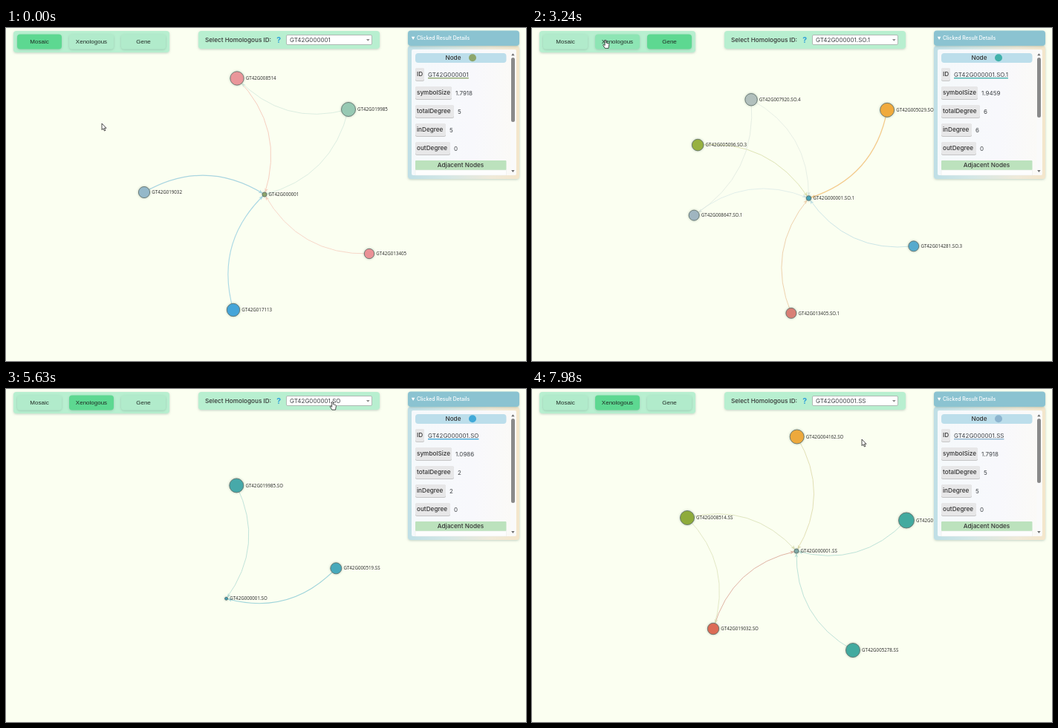
Animation, 700 px wide and 450 px high, one loop 8 s. Source, as an HTML page:

```html
<!DOCTYPE html>
<html lang="en">
<head>
<meta charset="utf-8">
<title>Homologous gene graph</title>
<style>
html, body { margin: 0; width: 100%; height: 100%; overflow: hidden; background: #fbfff1; }
svg { display: block; width: 100%; height: 100%; }
text { font-family: Inter, sans-serif; font-size: 8px; fill: #3f4347; }
.btn { font-family: "Liberation Sans", Arial, sans-serif; text-anchor: middle; fill: #1f2a24; }
.lab { font-family: "Noto Sans", sans-serif; font-size: 6.2px; fill: #333; }
.key { font-size: 8.2px; font-weight: 500; fill: #333; }
.mid { text-anchor: middle; }
.opt { font-size: 9px; }
</style>
</head>
<body>
<svg viewBox="0 0 700 450">
  <defs>
    <filter id="soft" x="-20%" y="-40%" width="140%" height="180%">
      <feDropShadow dx="0" dy="1" stdDeviation="1.8" flood-color="#6a8f80" flood-opacity=".4"/>
    </filter>
    <filter id="halo" x="-60%" y="-60%" width="220%" height="220%">
      <feDropShadow dx="0" dy="0" stdDeviation="1.8" flood-color="#40604c" flood-opacity=".4"/>
    </filter>
    <linearGradient id="frame">
      <stop offset="0" stop-color="#bfdfe6"/>
      <stop offset=".35" stop-color="#d4e7e6"/>
      <stop offset=".75" stop-color="#f0ead9"/>
      <stop offset="1" stop-color="#f4e6cb"/>
    </linearGradient>
    <linearGradient id="paper">
      <stop offset="0" stop-color="#f5f9fb"/>
      <stop offset=".6" stop-color="#f8f8fc"/>
      <stop offset="1" stop-color="#fbfaf6"/>
    </linearGradient>
  </defs>
  <g id="graphs"></g>
  <g id="tabs"></g>
  <g id="picker"></g>
  <g id="panel"></g>
  <g id="menu"></g>
  <g id="cursor" stroke="#222" stroke-width=".8" stroke-linejoin="round" fill="#fff">
    <path id="arrow" d="M0 0V8.6L2 6.8L3.4 10L4.8 9.4L3.4 6.3H6Z"/>
    <path id="hand" d="M-.9 .8Q0-.6 .9 .8V4L4.2 4.9Q5 5.2 4.8 6.4L4 11.4H-.7L-3.3 7.3Q-3.5 6-2.2 6.4L-.9 7.6Z"/>
  </g>
</svg>
<script>
const LOOP = 8000, SPAN = 2790, CURVE = 0.3;
const $ = id => document.getElementById(id);
const NS = document.querySelector('svg').namespaceURI;

function add(parent, tag, attrs, text) {
  const el = document.createElementNS(NS, tag);
  set(el, attrs);
  if (text !== undefined) el.textContent = text;
  parent.appendChild(el);
  return el;
}
function set(el, attrs) {
  for (const k in attrs) el.setAttribute(k, attrs[k]);
}
function rect(parent, x, y, width, height, fill, rx = 0, more = {}) {
  return add(parent, 'rect', { x, y, width, height, fill, rx, ...more });
}
function label(parent, x, y, cls, text, more = {}) {
  return add(parent, 'text', { x, y, class: cls, ...more }, text);
}
const show = (el, on) => el.setAttribute('display', on ? 'inline' : 'none');

// Node: [name, x, y, radius, colour, link width, link colour, drift]; the first one is the hub.
const mosaic = {
  tab: 0, id: 'GT42G000001', size: '1.7918', degree: 5, thumb: 87, dot: '#8da66c', grow: 0.006,
  nodes: [
    ['GT42G000001', 348, 225, 3, '#8da66c'],
    ['GT42G008514', 311, 68, 9.2, '#ea969a', 1, '#f6cfc0'],
    ['GT42G019985', 461, 110, 9.5, '#97c9b3', 0.7, '#cfe6da'],
    ['GT42G019032', 186, 222, 7.6, '#94b8c9', 1.2, '#a9d5e0'],
    ['GT42G017113', 306, 381, 8.7, '#45a5d9', 1.1, '#a9d8e4'],
    ['GT42G013405', 489, 305, 6.7, '#ea9196', 0.9, '#f6d3c4']
  ],
  extra: [2, 1]
};
const xeno = {
  tab: 1, id: 'GT42G000001.SO', size: '1.0986', degree: 2, thumb: 114, dot: '#41a9d8',
  nodes: [
    ['GT42G000001.SO', 295.5, 284, 2, '#3f9fb4', 0, '', [1.5, -1]],
    ['GT42G019985.SO', 316, 134, 9.5, '#46a9a9', 0.8, '#b3dcd4', [-8, -5]],
    ['GT42G000519.SS', 440, 238, 7.5, '#46a9bb', 1.1, '#9ed4da', [6, 6]]
  ]
};
const gene = {
  tab: 2, id: 'GT42G000001.SO.1', size: '1.9459', degree: 6, thumb: 81, dot: '#41b0aa', grow: 0.02,
  nodes: [
    ['GT42G000001.SO.1', 372.5, 230, 3.3, '#48a4b8'],
    ['GT42G007920.SO.4', 295.5, 97.5, 8.2, '#b2c0bd', 0.6, '#dbe5dd'],
    ['GT42G005029.SO.1', 477.5, 111.5, 9.5, '#f0aa3c', 1.3, '#f3cb8c'],
    ['GT42G005096.SO.3', 224, 158.5, 7.8, '#97b13f', 0.9, '#dbe0ae'],
    ['GT42G008647.SO.1', 219, 253, 7, '#9fb5c0', 0.6, '#d0e3e4'],
    ['GT42G014281.SO.3', 513, 294.5, 7, '#56aacd', 0.8, '#bfdfe4'],
    ['GT42G013405.SO.1', 349, 384.5, 7, '#d87f74', 1, '#eed2ae']
  ],
  extra: [1, 4]
};
const second = {
  tab: 1, id: 'GT42G000001.SS', size: '1.7918', degree: 5, thumb: 87, dot: '#8cb4cf', grow: 0.02,
  nodes: [
    ['GT42G000001.SS', 356, 219, 3, '#7fa9a6'],
    ['GT42G004162.SO', 356.7, 64.5, 9.5, '#eda93d', 0.9, '#dfdcae'],
    ['GT42G008514.SS', 209, 174, 9.5, '#8eab3a', 0.8, '#d9dfb4'],
    ['GT42G017113.SS', 504, 177.5, 10.5, '#43aa9f', 0.9, '#b7dfd5'],
    ['GT42G005278.SS', 432, 353, 9.5, '#43aa9f', 0.9, '#b7dfd5'],
    ['GT42G019032.SO', 244, 324, 7.7, '#dc6c56', 1, '#dfb4a4']
  ],
  extra: [2, 5]
};
// at: when the scene appears; ref: when its nodes pass through the listed places.
const scenes = [
  { at: 0, ref: 0, graph: mosaic },
  { at: 750, ref: 1060, graph: xeno },
  { at: 2250, ref: 2560, graph: gene },
  { at: 3450, ref: 3760, graph: xeno },
  { at: 7100, ref: 7980, graph: second }
];
const OPEN = 6200, CLOSE = 7100;

function buildGraph(g) {
  g.el = add($('graphs'), 'g', {});
  const pairs = g.nodes.slice(1).map((_, i) => [i + 1, 0]);
  if (g.extra) pairs.push(g.extra);
  g.links = pairs.map(([from, to]) => {
    const width = to ? 0.7 : g.nodes[from][5], colour = g.nodes[from][6];
    return {
      from, to,
      line: add(g.el, 'path', { fill: 'none', stroke: colour, 'stroke-width': width }),
      tip: add(g.el, 'path', { d: 'M0 0L-5.5 2.4L-4 0L-5.5 -2.4Z', fill: colour })
    };
  });
  g.marks = g.nodes.map(([name, , , r, fill]) => {
    const el = add(g.el, 'g', {});
    add(el, 'circle', { r, fill, stroke: '#5a6a66', 'stroke-width': 0.8, filter: 'url(#halo)' });
    label(el, r + 2.6, 2.2, 'lab', name);
    return el;
  });
}

function drawGraph(scene, t) {
  const g = scene.graph, [, cx, cy] = g.nodes[0];
  const p = (t - scene.ref) / SPAN, u = p * (1.2 - 0.2 * p);
  const spread = scene.at ? 1 - 0.35 * Math.exp(-(t - scene.at) / 55) : 1;
  const pts = g.nodes.map(([, x, y, , , , , drift]) => {
    const [dx, dy] = drift || [(x - cx) * g.grow, (y - cy) * g.grow];
    return [cx + (x + dx * u - cx) * spread, cy + (y + dy * u - cy) * spread];
  });
  g.marks.forEach((m, i) => set(m, { transform: `translate(${pts[i]})` }));
  for (const { from, to, line, tip } of g.links) {
    const [x1, y1] = pts[from], [x2, y2] = pts[to];
    const qx = (x1 + x2) / 2 - (y1 - y2) * CURVE;
    const qy = (y1 + y2) / 2 - (x2 - x1) * CURVE;
    const a = Math.atan2(y2 - qy, x2 - qx), r = g.nodes[to][3];
    set(line, { d: `M${x1} ${y1}Q${qx} ${qy} ${x2} ${y2}` });
    set(tip, {
      transform: `translate(${x2 - r * Math.cos(a)} ${y2 - r * Math.sin(a)}) rotate(${a * 180 / Math.PI})`
    });
  }
}

// Tabs
rect($('tabs'), 10, 4, 210, 29, '#b8efd0', 4, { filter: 'url(#soft)' });
const tabs = ['Mosaic', 'Xenologous', 'Gene'].map((name, i) => {
  const x = 15 + i * 70;
  const box = rect($('tabs'), x, 8.5, 60, 20, '#b1ebcb', 4, { filter: 'url(#soft)' });
  label($('tabs'), x + 30, 21.3, 'btn', name);
  return { x, box };
});

// Picker
const picker = $('picker');
rect(picker, 259, 4, 244, 24, '#b8efd0', 4, { filter: 'url(#soft)' });
label(picker, 268, 18.8, 'key', 'Select Homologous ID:');
label(picker, 367.3, 20, 'mid', '?', { style: 'font-size:10.5px;font-weight:700;fill:#2d9fd8' });
rect(picker, 377.5, 9.5, 115, 13, '#fff', 1.5, { stroke: '#a5aaa7', 'stroke-width': 0.8 });
const chosen = label(picker, 382, 19, '', '');
const caretMark = add(picker, 'path', { fill: '#888' });

// Drop-down menu
const menu = $('menu');
rect(menu, 377.5, 22.5, 115, 55.5, '#fff', 0, { stroke: '#a5aaa7', 'stroke-width': 0.8 });
rect(menu, 380.5, 25.5, 109, 12.5, '#fff', 0, { stroke: '#999', 'stroke-width': 0.8 });
const caret = rect(menu, 382, 27, 0.8, 9, '#333');
const options = ['GT42G000001.SO', 'GT42G000001.SS'].map((name, i) => ({
  box: rect(menu, 378, 40 + i * 19, 114, 19, '#fff'),
  text: label(menu, 381, 52.7 + i * 19.4, 'opt', name)
}));

// Details panel
const panel = $('panel');
rect(panel, 541, 24, 150, 180, 'url(#frame)', 4, { filter: 'url(#soft)' });
rect(panel, 541, 3.5, 150, 20.5, '#8bc3d1', 4, { filter: 'url(#soft)' });
add(panel, 'path', { d: 'M545.8 11.8h4.6l-2.3 4.2z', fill: '#fff' });
label(panel, 553, 16.4, '', 'Clicked Result Details', { style: 'font-size:6.9px;font-weight:500;fill:#fff' });
rect(panel, 546, 29, 141, 170, 'url(#paper)', 2);
rect(panel, 551, 34, 122.5, 13, '#bcdeeb', 4);
label(panel, 602, 43.3, 'key mid', 'Node');
const dot = add(panel, 'circle', { cx: 628, cy: 40.3, r: 5 });
const rows = [['ID', 12], ['symbolSize', 49], ['totalDegree', 52], ['inDegree', 41], ['outDegree', 47]];
const values = rows.map(([key, w], i) => {
  const y = 54 + i * 25;
  rect(panel, 551, y + 0.8, w, 17, '#b5b5b5', 2);
  rect(panel, 551, y, w, 17, '#e7e7e8', 2);
  label(panel, 553, y + 11.4, 'key', key);
  return label(panel, 556 + w, y + 11.6, '', '');
});
const underline = rect(panel, 568, 67, 55, 1.4, '#000');
rect(panel, 551, 179, 122.5, 13, '#bce2bd', 1);
rect(panel, 551, 192, 122.5, 7, '#fdfdfd', 0, { stroke: '#e6e9e6', 'stroke-width': 0.5 });
label(panel, 612, 188.3, 'key mid', 'Adjacent Nodes');
rect(panel, 679.5, 30, 6.5, 168, '#fafafa');
add(panel, 'path', { d: 'M680.2 37.2h4.4l-2.2-3zM680.2 192h4.4l-2.2 3z', fill: '#6d6d6d' });
const thumb = rect(panel, 680, 40, 5, 87, '#8a8a8a', 2.5);

// Pointer path: [time, x, y]
const path = [
  [0, 129, 129], [100, 129, 129], [560, 118, 21], [1360, 121, 21], [1750, 121, 21],
  [2120, 191, 17], [2720, 191, 17], [3220, 99, 16], [4180, 99, 16], [4560, 373, 24],
  [5100, 373, 24], [5750, 446, 16], [6620, 446, 16], [6900, 446, 66], [7400, 446, 66],
  [7800, 444, 68], [LOOP, 444, 68]
];
function pointer(t) {
  const i = path.findIndex(k => k[0] > t), [t0, x0, y0] = path[i - 1], [t1, x1, y1] = path[i];
  const p = (t - t0) / (t1 - t0), e = p * p * (3 - 2 * p);
  return [x0 + (x1 - x0) * e, y0 + (y1 - y0) * e];
}

const graphs = [mosaic, xeno, gene, second];
graphs.forEach(buildGraph);
let current = null;

function showScene(scene) {
  const g = scene.graph;
  graphs.forEach(other => show(other.el, other === g));
  chosen.textContent = g.id;
  [g.id, g.size, g.degree, g.degree, 0].forEach((v, i) => { values[i].textContent = v; });
  set(dot, { fill: g.dot });
  set(underline, { fill: g.dot, width: values[0].getComputedTextLength() });
  set(thumb, { height: g.thumb });
  current = scene;
}

function render(t) {
  const scene = scenes.filter(s => s.at <= t).pop();
  if (scene !== current) showScene(scene);
  drawGraph(scene, t);

  const [x, y] = pointer(t);
  let overTab = false;
  tabs.forEach((tab, i) => {
    const hover = y > 8 && y < 29 && x >= tab.x && x <= tab.x + 60;
    const active = i === scene.graph.tab;
    overTab = overTab || hover;
    set(tab.box, { fill: active ? (hover ? '#70e1a1' : '#5dd891') : hover ? '#8de5b4' : '#b1ebcb' });
  });

  const open = t >= OPEN && t < CLOSE;
  show(menu, open);
  set(caretMark, { d: open ? 'M485 17.4h4.6l-2.3-2.8z' : 'M485 15h4.6l-2.3 2.8z' });
  show(caret, (t - OPEN) % 1000 < 500);
  const picked = y > 59 ? 1 : 0;
  options.forEach(({ box, text }, i) => {
    set(box, { fill: i === picked ? '#5897fb' : '#fff' });
    text.style.fill = i === picked ? '#fff' : '#444';
  });

  const hand = overTab || (y < 33 && x > 362 && x < 493);
  show($('hand'), hand);
  show($('arrow'), !hand);
  set($('cursor'), { transform: `translate(${x} ${y})` });
}

const start = performance.now();
function tick() {
  render((performance.now() - start) % LOOP);
  requestAnimationFrame(tick);
}
tick();
</script>
</body>
</html>
```
